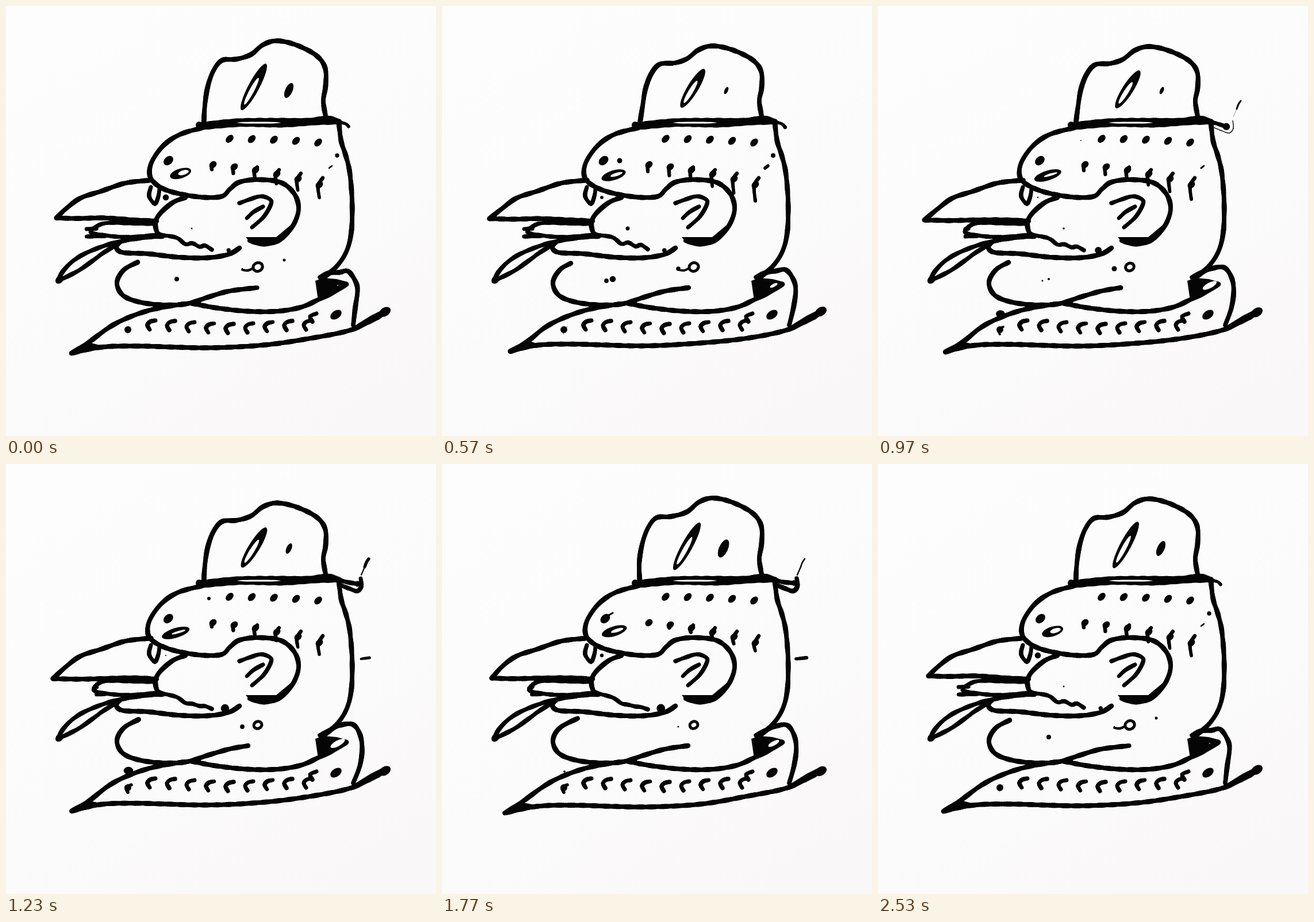
These frames come from a looping animation (748 by 748 pixels, 2560 ms). An HTML page with a canvas:

```html
<!DOCTYPE html>
<html lang="en">
<head>
<meta charset="utf-8">
<title>Snake in a hat</title>
<style>
html, body { margin: 0; width: 100%; height: 100%; overflow: hidden; background: #fcfafa; }
canvas { display: block; width: 100vw; height: 100vh; }
</style>
</head>
<body>
<canvas id="stage" width="748" height="748"></canvas>
<script>
const ctx = document.getElementById('stage').getContext('2d');
const INK = '#050505';
const PAPER = '#fefdfd';
const LOOP = 2560;
const STEP = 100 / 3;
const FRAMES = 76;
const PEN = 8.2;
let phase = 0;

// Every moving part follows one cosine per loop, greatest at phase "peak".
const wave = (mid, amp, peak) => mid + amp * Math.cos((phase - peak) * Math.PI * 2);
const pulse = (mid, amp, peak) => Math.max(0, wave(mid, amp, peak));
const part = (mid, amp, peak) => Math.min(1, pulse(mid, amp, peak));

const pairs = flat => Array.from({ length: flat.length / 2 }, (_, i) => [flat[2 * i], flat[2 * i + 1]]);

function spline(pts) {
  const out = [pts[0]];
  for (let i = 0; i < pts.length - 1; i++) {
    const a = pts[i - 1] || pts[i], b = pts[i], c = pts[i + 1], d = pts[i + 2] || c;
    const n = Math.max(3, Math.ceil(Math.hypot(c[0] - b[0], c[1] - b[1]) / 4));
    for (let k = 1; k <= n; k++) {
      const s = k / n;
      out.push([0, 1].map(j => b[j] + 0.5 * s * (c[j] - a[j]
        + s * (2 * a[j] - 5 * b[j] + 4 * c[j] - d[j] + s * (3 * (b[j] - c[j]) + d[j] - a[j])))));
    }
  }
  return out;
}

// Brush line with a slightly uneven weight.
function line(width, ...flat) {
  if (width < 0.3) return;
  const pts = spline(pairs(flat));
  for (let i = 1; i < pts.length; i++) {
    const [x, y] = pts[i];
    ctx.lineWidth = width * (1 + 0.08 * Math.sin(x * 0.31 + y * 0.17));
    ctx.beginPath();
    ctx.moveTo(...pts[i - 1]);
    ctx.lineTo(x, y);
    ctx.stroke();
  }
}

function patch(...flat) {
  ctx.fillStyle = INK;
  ctx.beginPath();
  pairs(flat).forEach(p => ctx.lineTo(...p));
  ctx.fill();
}

function oval(x, y, rx, ry = rx, tilt = 0, color = INK) {
  if (rx < 0.3 || ry < 0.3) return;
  ctx.fillStyle = color;
  ctx.beginPath();
  ctx.ellipse(x, y, rx, ry, tilt, 0, Math.PI * 2);
  ctx.fill();
}

function paper() {
  const g = ctx.createLinearGradient(150, 0, 600, 748);
  g.addColorStop(0, '#fefdfd');
  g.addColorStop(0.6, '#fcfbfb');
  g.addColorStop(1, '#f9f7f8');
  ctx.fillStyle = g;
  ctx.fillRect(0, 0, 748, 748);
}

function hat() {
  const grow = wave(0.972, 0.05, 0.83);
  const lean = wave(-1, 3, 0.25);
  const up = y => 200 - (200 - y) * grow;
  line(PEN, 344, 205, 347 + lean, up(172), 352 + lean, up(140), 362 + lean, up(112), 377 + lean, up(94),
    402 + lean, up(92), 426, up(84), 447, up(67), 471, up(60), 504, up(67), 539, up(85),
    555, up(107), 556, up(138), 552, 165, 556, 192);

  // Crease, open at the lower end, and the spot beside it
  const x1 = wave(451, 4, 0.25), y1 = wave(108, 7, 0.37);
  const x2 = wave(411, 6.5, 0.25), y2 = wave(178, 4, 0.76);
  const len = Math.hypot(x2 - x1, y2 - y1) / 2;
  const tilt = Math.atan2(y2 - y1, x2 - x1);
  oval((x1 + x2) / 2, (y1 + y2) / 2, len + 3, 9.5, tilt);
  oval(x1 * 0.4 + x2 * 0.6, y1 * 0.4 + y2 * 0.6, len * 0.62, 4, tilt, PAPER);
  const spot = wave(12, 6, 0.8);
  oval(wave(492, 2.5, 0.25), 147, spot, spot * 0.46, -1.15);
}

function brim() {
  line(PEN, 335, 207, 400, 200, 470, 199, 525, 199, 560, 195, 580, 201);
  line(PEN, 345, 211, 410, 206, 480, 207, 540, 203, 580, 202);
  oval(440, 203, 38, 1.6, 0, PAPER);
  oval(336, 207, 6);

  // The right end swells, then curls into a loop with a flick above it
  const curl = part(-0.1, 1.3, 0.6);
  const tipX = wave(604, 10, 0.6), tipY = wave(209, 2, 0.2);
  line(wave(6.5, 1.5, 0.6), 577, 201, 591, 205, tipX, tipY);
  oval(tipX, tipY, wave(6, 4, 0.6) * (1 - curl / 2));
  line(PEN * curl, 583, 211, 598, 217, 611, 221, 618, 213, 617, 199);
  line(2.5 * curl, 618, 193, 624, 179);
  line(pulse(-0.5, 6, 0.53), 624, 179, 627, 171, 631, 165);
}

function head() {
  const dx = wave(-2, 2.2, 0.88);
  line(PEN, 345, 211, 304 + dx, 223, 275 + dx, 242, 255 + dx, 269, 250 + dx, 291, 257 + dx, 306,
    276, 319, 308, 328, 346, 333, 376, 331, 390, 318, 407, 306, 440, 302, 478, 307,
    501, 326, 509, 351, 502, 377, 485, 400, 467, 411, 445, 414, 424, 408);
  patch(417, 402, 470, 402, 500, 377, 487, 403, 468, 415, 446, 418, 426, 413);
  line(7, 406, 343, 425, 336, 444, 331, 460, 337, 460, 347, 448, 367, 428, 385);
  line(7, 419, 369, 431, 358, 447, 349);

  // Eye, nostril and tooth
  oval(wave(282.5, 1.5, 0.75), 269, 9.5, 7, -0.75);
  oval(309, 269, pulse(-5, 9.5, 0.225));
  line(pulse(-2, 6, 0.78), 287, 265, 297, 259);
  const nx = wave(299.5, 4.5, 0.94), ny = wave(292.5, 2.5, 0.33), nr = wave(22, 3, 0.48);
  oval(nx, ny, nr, 8.5, -0.3);
  oval(nx + 5, ny - 1.5, nr * 0.5, wave(3, 1, 0.95), -0.3, PAPER);
  line(7, 252, 315, 249, 331, 259, 344, 265, 331, 267, 317);
  oval(278, 333, wave(3.2, 2.2, 0.95));
}

function skinMarks() {
  oval(353, 234, pulse(-7, 10, 0.486));
  for (let i = 0; i < 5; i++) oval(389 + 38.5 * i, 231 + i * i * 0.4, 8, 5.5, -0.8);

  // Lower row: drops that grow tails, longer towards the back
  const tail = part(0.5, 0.55, 0.22);
  for (let i = 0; i < 6; i++) {
    const x = 360 + 37 * i, y = 276 + 3 * i + 0.8 * i * i;
    const reach = 3 + i * 2.2 + (9 + i) * tail;
    oval(x, y, 7, 5.5, -0.7);
    line(6, x + 1 + i, y - i * 2.4, x - 2, y + 2, x - 2 + i * 0.4, y + reach);
  }

  oval(576, 260, pulse(0, 5, 0.12));
  line(pulse(1, 4.5, 0.2), 562, 282, 567, 278);
  const dash = pulse(-1.5, 8.5, 0.61);
  line(dash, 625 - dash * 1.6, 339, 625 + dash * 1.6, 337);
}

function prey() {
  const tipX = wave(85, 4, 0.88), tipY = wave(371, 2.5, 0.55);
  line(PEN, tipX, tipY, 105, 352, 130, 334, 166, 322, 208, 308, 253, 303);
  line(PEN, tipX, tipY, 125, tipY + 1, 170, tipY, 220, 372, 262, 374);
  line(PEN, 312, 333, 290, 342, 268, 361, 260, 377, 263, 394, 272, 400);

  const barbX = wave(150, 3, 0.55), prong = wave(149, 10, 0.58);
  line(7, 258, 379, 215, 378, 181, 377, 162, 381, barbX, 393, 172, 399, 213, 402, 264, 398);
  line(7, prong, 388, 157, 387);
  line(7, prong, 401, 172, 400);

  line(7.5, 91, 478, 98, 463, 116, 444, 143, 428, 188, 412, 240, 403, 272, 401);
  line(7.5, 91, 478, 125, 461, 151, 443, 170, 429, 198, 412);
  oval(93, 476, 8, 6, -0.8);
  line(PEN, 196, 413, 192, 421, 204, 429, 247, 431, 300, 437, 350, 438, 387, 432, 406, 421);

  // Ragged lower lip, smoother in the second half of the loop
  const drop = wave(0, 4, 0.65);
  line(7, 266, 398, 296, 404 + drop / 2, 312, 415 + drop / 3, 324, 415 + drop, 337, 420 + drop / 2,
    346, 419 + drop, 358, 425 + drop / 2);
  oval(wave(384, 4, 0.1), 425, wave(5.5, 2.3, 0.6));
  oval(323, 387, pulse(0.5, 3, 0.2));
}

function body() {
  line(PEN, 579, 203, 583, 235, 591, 260, 598, 290, 602, 340, 601, 390, 593, 425, 576, 452, 552, 473);
  line(PEN, wave(230, 6, 0.72), wave(445, 2.5, 0.2), 205, 459, 193, 481, 203, 503, 232, 515, 274, 520,
    315, 518, 350, 507, 388, 496, wave(429, 8, 0.97), 490);
  line(PEN, 322, 517, 365, 525, 420, 531, 471, 531, 513, 524, 545, 510, 570, 498, 592, 484);

  // Dark hollow and the coil wrapped round it
  const topX = wave(599, 4, 0.5), topY = wave(457, 4.5, 0.05), side = wave(615.5, 4, 0.48);
  patch(538, 478, 552, 473, 575, 475, 594, 480, 590, 488, 569, 500, 543, 512);
  const leaf = part(0.6, 0.5, 0.5);
  oval(577, 486, 14 * leaf, 5 * leaf, -0.5, PAPER);
  line(PEN, 546, 472, 560, 465, 580, topY + 2, topX, topY, side - 4, topY + 17, side, 495, side - 4, 525, 604, 555);
}

function tail() {
  const x = wave(114, 5, 0.25), y = wave(604, 3.3, 0.75);
  const neckX = wave(144, 6, 0.25), neckY = wave(585.5, 3, 0.72), sag = wave(1, 3, 0.78);
  line(PEN, x, y, neckX, neckY, 178, 560, 208, 544, 247, 530, 285, 522, 335, 515);
  line(PEN, x, y, 165, 592 + sag, 230, 590 + sag, 350, 593 + sag, 450, 588 + sag, 530, 578, 595, 565, 632, 549, 662, 531);
  patch(x, y, neckX, neckY, 180, 593 + sag, 140, 600 + sag);
  patch(602, 559, 634, 539, 660, 526, 666, 532, 650, 545, 600, 568);
  oval(659, wave(533, 1.5, 0.65), 11, 7.5, -0.55);

  const bump = pulse(2, 6.5, 0.45);
  oval(213, wave(538, 5, 0.05), bump, bump * 0.8);
  oval(212, 563, 6);
  line(6 * part(0.55, 0.6, 0.6), 218, 558, 209, 563, 212, 571);
  for (let i = 0; i < 9; i++) {
    const hx = 250 + 34 * i, hy = 556 + 3 * Math.sin(i * 0.8 - 1.6);
    line(7, hx + 10, hy - 6, hx + 1, hy - 4, hx - 4, hy + 2, hx, hy + 10);
  }
  line(7, 540, 535, 529, 540, 533, 549);
  oval(574, 537, 11, 7, -0.6);
}

function bellyMarks() {
  oval(297, 475, pulse(1.5, 4.3, 0.15));
  oval(286, 478, pulse(-4, 8, 0.25));
  const r = wave(9.2, 0.8, 0.1);
  oval(438, 454, r + 1, r, -0.4);
  oval(438, 454, r - 4, r - 5, -0.4, PAPER);
  line(pulse(0, 5, 0.1), 411, 459, 421, 460, 430, 456);
  oval(411, 457, pulse(2.5, 2, 0.36));
  oval(484, 442, pulse(-6, 8.5, 0));
}

function draw(time) {
  phase = Math.floor((time % LOOP + 4) / STEP) / FRAMES;
  ctx.lineCap = ctx.lineJoin = 'round';
  ctx.strokeStyle = INK;
  [paper, body, tail, prey, head, hat, brim, skinMarks, bellyMarks].forEach(paint => paint());
}

let start;
function tick(time) {
  start ??= time;
  draw(time - start);
  requestAnimationFrame(tick);
}
draw(0);
requestAnimationFrame(tick);
</script>
</body>
</html>
```
